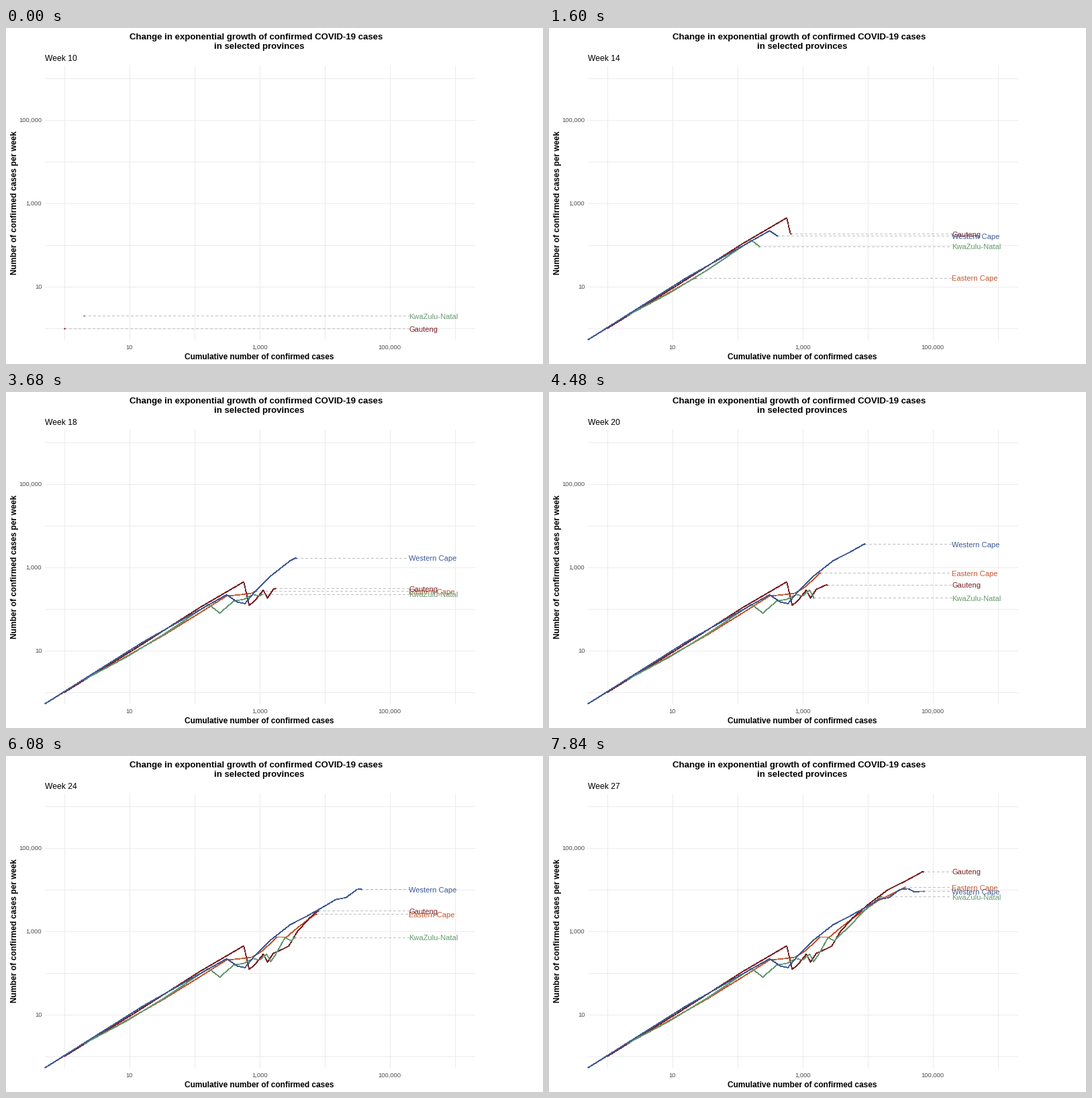
Write a matplotlib script that moves like this. It is 800 px wide and 500 px high and loops after 8 s.

```python
import numpy as np
import matplotlib.pyplot as plt
from matplotlib.animation import FuncAnimation

W, H, DPI = 800, 500, 100
PX = 72 / DPI  # one pixel in points
FRAMES, STEP = 50, 160
FIRST_WEEK, N_WEEKS = 10, 19
WEEKS_PER_FRAME = 53 / 149
LEFT, RIGHT, TOP, BOTTOM = 58, 698, 56, 464
LABEL_X = 600.5

# Weekly cases grow log-linearly between shared knots; single weeks jolt
# off that trend. All values are powers of ten.
KNOTS = (0, 2, 3, 6, 8, 11, 15, 18)
PROVINCES = (
    dict(name="Eastern Cape", color="#c4572e", start=2,
         trend=(0, .3, .9, 2.31, 2.38, 2.86, 3.75, 4.14),
         jolts={10: .16}),
    dict(name="Gauteng", color="#7a2328", start=0,
         trend=(0, 2.03, 2.65, 2.45, 2.47, 2.64, 4, 4.56),
         jolts={4: -.5, 5: -.31, 7: -.2}),
    dict(name="KwaZulu-Natal", color="#659a70", start=0,
         trend=(.3, 1.4, 2.11, 2.23, 2.46, 2.43, 3.11, 4.04),
         jolts={4: -.25, 8: -.15, 10: -.17, 12: .25}),
    dict(name="Western Cape", color="#3d5b96", start=1,
         trend=(.53, 1.87, 2.34, 2.44, 3.16, 3.76, 3.95, 3.96),
         jolts={4: -.21, 5: -.28, 13: .15, 14: .12}),
)

plt.rcParams["font.family"] = "Liberation Sans"
fig = plt.figure(figsize=(W / DPI, H / DPI), dpi=DPI, facecolor="white")
ax = fig.add_axes([0, 0, 1, 1])
ax.set_xlim(0, W)
ax.set_ylim(H, 0)
ax.axis("off")


def x_pos(decade):
    return 87.2 + 97 * decade


def y_pos(decade):
    return 446.8 - 62 * decade


def write(x, y, text, px, color="black", **kw):
    return ax.text(x, y, text, fontsize=px * PX, color=color,
                   va="baseline", **kw)


def stroke(xs, ys, color, px, **kw):
    return ax.plot(xs, ys, color=color, lw=px * PX, antialiased=False,
                   solid_capstyle="butt", **kw)[0]


def draw_chart():
    for d in range(7):
        stroke([x_pos(d)] * 2, [TOP, BOTTOM], "#ebebeb", 1, zorder=1)
        stroke([LEFT, RIGHT], [y_pos(d)] * 2, "#ebebeb", 1, zorder=1)
    for d in (1, 3, 5):
        tick = f"{10 ** d:,}"
        write(x_pos(d) - .4, 477.5, tick, 9.3, "#4d4d4d", ha="center")
        write(53.3, y_pos(d) + 3.5, tick, 9.3, "#4d4d4d", ha="right")
    bold = dict(weight="bold", ha="center")
    write(373, 17, "Change in exponential growth of confirmed COVID-19 cases",
          13.25, **bold)
    write(377.5, 31, "in selected provinces", 13.2, **bold)
    write(377, 493, "Cumulative number of confirmed cases", 11.95, **bold)
    write(16, 260, "Number of confirmed cases per week", 12,
          rotation=90, rotation_mode="anchor", **bold)


class Trail:
    """One province: its line, tip, leader and label."""

    def __init__(self, z, name, color, start, trend, jolts):
        weeks = np.arange(N_WEEKS)
        power = np.interp(weeks, KNOTS, trend)
        for week, jolt in jolts.items():
            power[week] += jolt
        self.shown = weeks >= start
        total = np.cumsum(np.where(self.shown, 10 ** power, 0))
        # Weeks without cases sit in the lower left corner of the panel
        self.x = np.where(self.shown, x_pos(np.log10(np.maximum(total, 1))), LEFT)
        self.y = np.where(self.shown, y_pos(power), BOTTOM)
        self.at = np.round(weeks / WEEKS_PER_FRAME)
        self.leader = stroke([], [], "#bebebe", 1, zorder=2,
                             dashes=(4, 4), dash_capstyle="butt")
        # Without antialiasing every touched pixel fills: this shows as 2 px
        self.line = stroke([], [], color, .7, zorder=3 + z)
        self.dot = ax.plot([], [], "o", color=color, ms=2.4 * PX, mew=0,
                           zorder=3 + z)[0]
        self.label = write(LABEL_X, 0, name, 11.1, color, zorder=10 + z)

    def update(self, frame):
        passed = int(np.sum(self.at <= frame))
        visible = bool(self.shown[passed - 1])
        for part in (self.leader, self.line, self.dot, self.label):
            part.set_visible(visible)
        tx = np.interp(frame, self.at, self.x)
        ty = np.interp(frame, self.at, self.y)
        self.line.set_data(np.append(self.x[:passed], tx),
                           np.append(self.y[:passed], ty))
        self.dot.set_data([tx], [ty])
        self.leader.set_data([tx, 600], [ty, ty])
        self.label.set_y(ty + 4.7)


draw_chart()
subtitle = write(57.5, 49, "", 12.1)
trails = [Trail(z, **province) for z, province in enumerate(PROVINCES)]


def update(frame):
    week = round(FIRST_WEEK + frame * WEEKS_PER_FRAME)
    subtitle.set_text(f"Week {week}")
    for trail in trails:
        trail.update(frame)
    return [subtitle]


anim = FuncAnimation(fig, update, frames=FRAMES, interval=STEP,
                     init_func=lambda: update(0), repeat=True, repeat_delay=0)
plt.show()
```
